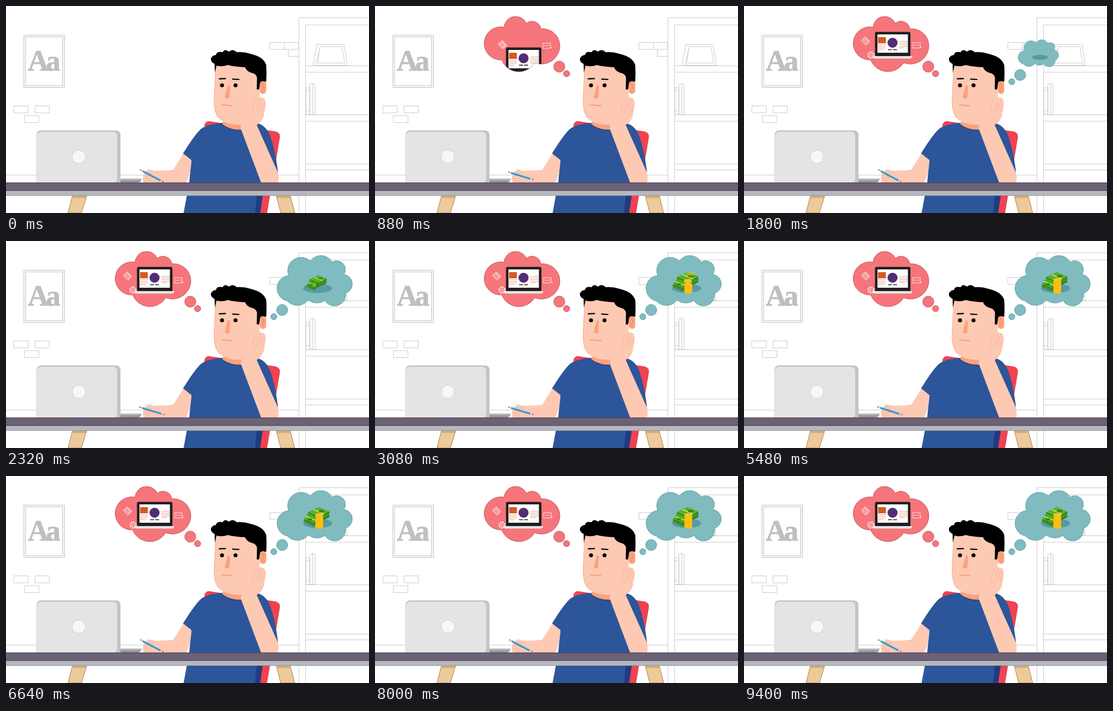
Recreate the animation shown at these times as an HTML page. Size 650 px wide and 372 px high, loop 9.44 s.

```html
<!DOCTYPE html>
<html lang="en">
<head>
<meta charset="utf-8">
<title>Daydreaming at the desk</title>
<style>
  html, body { margin: 0; width: 100%; height: 100%; overflow: hidden; background: #fff; }
  svg { display: block; width: 100vw; height: 100vh; }
  .line { fill: none; stroke: #cbcbcb; stroke-width: 1; }
  .skin { fill: #fdc9b3; }
  .shade { fill: #fba27c; }
  .crease { fill: none; stroke: #f9b399; stroke-width: 1; stroke-linecap: round; }
  .shirt { fill: #2d5599; }
  .navy { fill: #203c80; }
  .chair { fill: #f4414f; stroke: #b92f3c; stroke-width: .7; }
  .pink { fill: #f5757a; stroke: #b9474e; stroke-width: .8; }
  .teal { fill: #80bbc0; stroke: #57959b; stroke-width: .8; }
  .icon { fill: none; stroke: #fff; stroke-width: .8; }
  .wood { fill: #ecca9c; stroke: #a9824c; stroke-width: 1; }
  .poster { font: bold 52px "Liberation Serif", "Noto Serif", serif; letter-spacing: -5px;
            fill: #bfbfbf; stroke: #bfbfbf; stroke-width: .8; }
</style>
</head>
<body>
<svg viewBox="0 0 650 372" preserveAspectRatio="none">
  <defs>
    <path id="bubble" d="M231 38A21 21 0 0 1 271 31A16 16 0 0 1 297 41A31 31 0 0 1 331 70A33 33 0 0 1 286 102A33 33 0 0 1 227 97A29.800 29.800 0 1 1 231 38Z"/>
    <clipPath id="inside"><use href="#bubble"/></clipPath>
  </defs>

  <!-- room -->
  <g class="line">
    <path d="M0 304H524"/>
    <path stroke="#bdbdbd" d="M32 52.500H104.500V146.500H32ZM35 55.500H101.500V143.500H35Z"/>
    <path d="M14 179.500H40V192H14ZM52 179.500H77.500V192H52ZM33 197H59V209.500H33Z"/>
    <path d="M472.500 65.500H524V78H472.500ZM498.500 65.500V78M505.500 78V90.500H524"/>
    <path d="M650 21H524.500V372M650 34H536.500V372M536.500 107.500H650M536.500 119H650M536.500 195.500H650M536.500 207H650M536.500 284H650M536.500 294.500H650"/>
    <path d="M557 69H605.500L611 106.500H555M562.500 73H601.500L606.500 102.500H558ZM557 69L549 108M562 76L554 108"/>
    <path d="M537 147H544V195H537ZM537 152H544M537 188H544M544 141Q549 137 553.500 141V195H544ZM549.500 139V195"/>
  </g>
  <text class="poster" x="39" y="116">Aa</text>

  <!-- first thought -->
  <g id="pinkSmall"><circle class="pink" cx="343" cy="121.500" r="5.600"/></g>
  <g id="pinkLarge"><circle class="pink" cx="330" cy="109" r="10"/></g>
  <g id="pinkCloud"><use href="#bubble" class="pink"/></g>
  <g clip-path="url(#inside)">
    <g class="icon">
      <g id="tile"><path d="M210 62L217 55L225.500 63.500L218.500 70.500ZM212 62L217 57L223.500 63.500L218.500 68.500ZM214 61L220 67M215.500 59.500L221.500 65.500M216.500 58L223 64"/></g>
      <g id="gear">
        <circle cx="227.500" cy="88" r="2.300"/><circle cx="227.500" cy="88" r="4.700"/>
        <circle cx="227.500" cy="88" r="5.700" stroke-width="1.600" stroke-dasharray="2.200 2.280"/>
      </g>
      <g id="chat"><path d="M302 66H315.500V74H318L313 75.500H302Z"/><path d="M304.500 70.500H313" stroke-width="1.500" stroke-dasharray="1.500 2"/></g>
    </g>
    <g id="notebook">
      <rect x="234.500" y="46.500" width="63.500" height="45" rx="3" fill="#231f20"/>
      <path d="M239 51H293.500V84H239Z" fill="#fff"/>
      <path d="M240 56H254V67H240Z" fill="#d65a25"/>
      <circle cx="266" cy="66" r="9" fill="#522d72"/>
      <path d="M240 69.500H254M240 72.500H254M240 75.500H254M240 78.500H250M278 63.500H293M278 66.500H293M278 69.500H293M278 72.500H293M278 75H288" stroke="#e5a184" stroke-width=".9"/>
      <path d="M258 78.500H265M267 78.500H274" stroke="#2a2328" stroke-width="1.700"/>
      <path d="M230 90H301V92Q300 94.500 297 94.500H234Q231 94 230 92Z" fill="#e4e5e7"/>
    </g>
  </g>

  <!-- second thought -->
  <g id="tealSmall"><circle class="teal" cx="479.500" cy="136" r="5.500"/></g>
  <g id="tealLarge"><circle class="teal" cx="494.500" cy="124" r="10"/></g>
  <g id="tealCloud">
    <path class="teal" d="M506 62A24 24 0 0 1 545 36A23 23 0 0 1 584 38A15.500 15.500 0 0 1 605 60A17.500 17.500 0 0 1 608 94A20 20 0 0 1 571 107A25 25 0 0 1 541 106A24 24 0 0 1 504 108A23.300 23.300 0 0 1 506 62Z"/>
    <ellipse cx="558" cy="85" rx="26" ry="8.500" fill="#579ba0"/>
  </g>
  <g id="cash">
    <path d="M541 65L560 56L579 64V74L560 83L541 74Z" fill="#2f7d12"/>
    <path d="M541 65L560 56L579 64L560 73Z" fill="#59b526"/>
    <path d="M534 78L541 67L558 74V84L551 90L533 82Z" fill="#2d780f"/>
    <path d="M534 78L541 67L558 74L551 85Z" fill="#4fac20"/>
    <path d="M533.500 80.500L551 87.500L557 79M560 76L579 67M560 79L579 70" fill="none" stroke="#7acb43" stroke-width=".8"/>
    <path d="M551 60.500L570 68.500M537 72.500L554 79.500" stroke="#cfe39a" stroke-width="1.400"/>
    <ellipse cx="565" cy="63" rx="5" ry="2.300" fill="#34881a"/>
    <ellipse cx="544" cy="78" rx="4" ry="2.200" fill="#34881a"/>
  </g>
  <g id="coins"></g>

  <!-- person -->
  <path class="chair" d="M364 207.500L483 226Q491 228 490 236L467 372H430L361 224Q353 217 357 211Q359 207 364 207.500Z"/>
  <path class="shirt" d="M387 210Q361 212 349 221Q338 231 317 265L332 277L328 318L318 372H455L463 318L487 298Q482 258 473 233Q465 213 447 210Z"/>
  <path class="navy" d="M451 318H463L455 372H446Z"/>
  <path class="shade" d="M391 200L387 213Q402 224 426 223V200Z"/>
  <path d="M386 212.500Q402 225 426 223" fill="none" stroke="#203c80" stroke-width="1.500"/>
  <path class="skin" d="M376 101L372.500 160Q370 191 381 202Q394 214 421 213.500L452 196L458 100Z"/>
  <path class="crease" d="M375 118L373 160Q371 188 381 201"/>
  <path d="M374 120L373.500 104Q366 101 367 94Q370 88 376 88Q377 81 388 83Q392 76 399 82Q406 76 413 83Q426 82 438 86Q461 91 466 106Q467 120 466 136H456L453 150H449L449.500 129Q448 122 441 120.500Q431 118 428 110Q408 109 397 106Q387 110 377 107Z"/>
  <rect class="shade" x="454.500" y="135" width="11.500" height="23" rx="5.700"/>
  <path d="M458 140Q463 141 461 148Q457 151 460 154" fill="none" stroke="#ef845c"/>
  <path d="M382 130.800L393 130.300M406 131.300L417 132" stroke="#000" stroke-width="2.200" stroke-linecap="round"/>
  <g id="eyes"><circle cx="386.800" cy="142.500" r="3.600"/><circle cx="411" cy="142.500" r="3.600"/></g>
  <path class="shade" d="M397 143Q401 141 401 146L400 163Q400 167 396 166Q391 166 392 162Z"/>
  <path d="M386 177.800L405 179.300" stroke="#fa9f79" stroke-width="2" stroke-linecap="round"/>

  <path class="skin" d="M421 222Q419 213 427 207Q438 199 441 187Q443 173 449 167Q455 161 458 165Q465 164 465 175Q465 186 461 195Q459 207 449 214L486 297Q490 306 487 318H457Z"/>
  <path class="crease" d="M441 190Q443 173 449 167M449 187L455 167M454 188L460 167M459 190L463 174M449 188Q447 193 442 195M448 214Q459 207 462 194"/>

  <path class="skin" d="M317.500 265.500L299 295L267 296Q251 293 247 302Q243 309 247 318H322Q331 303 332 277Z"/>
  <path class="crease" d="M247 305H259Q262 308 259 310H247M250 314H260M299 295L294 296"/>
  <g id="pencil">
    <path d="M244 303.500L237.500 305L244 306.500Z" fill="#f1c9a0"/>
    <path d="M240 304.200L236.500 305L240 305.800Z" fill="#252525"/>
    <path d="M243 303.400H280V306.600H243Z" fill="#45b0e6"/>
    <path d="M243 305.200H280V306.600H243Z" fill="#2585bd"/>
    <path d="M279 303.400H282V306.600H279Z" fill="#d7dbe0"/>
    <rect x="282" y="303.400" width="3" height="3.200" rx="1.300" fill="#e4707d"/>
  </g>
  <path class="skin" d="M251 298Q253 292 259 294L266 299Q264 303 259 301Z"/>
  <path class="crease" d="M252 298L259 301L265 299"/>

  <!-- desk and laptop -->
  <path class="wood" d="M119 341H144.500L135 372H111ZM484 341H509L517 372H492Z"/>
  <path d="M119.500 341H144L143 345H118ZM484.500 341H508.500L510 345H486Z" fill="#d3ac78"/>
  <path d="M203 310H243Q242 317 235 318H203Z" fill="#97999b"/>
  <path d="M203 310H243L242 313H203Z" fill="#b8babb"/>
  <path d="M54.500 318V232Q55 223.500 63 223.500H197Q205 224 205 232V318Z" fill="#c4c4c5"/>
  <path d="M55 318V234Q56 226 64 226H191Q199 226 199 234V310Q199 318 191 318Z" fill="#e4e4e4"/>
  <circle cx="130.500" cy="271" r="12" fill="#f7f7f7" stroke="#cfcfcf"/>
  <path d="M0 317.500H650V332H0Z" fill="#6d6175"/>
  <path d="M0 332H650V341H0Z" fill="#b5b8be"/>
  <path d="M0 317.800H650M0 331.700H650" stroke="#49404f"/>
  <path d="M0 340.700H650" stroke="#8d9096" stroke-width=".8"/>
</svg>
<script>
const LOOP = 9440;
const TAP = LOOP / 47;
const $ = id => document.getElementById(id);

// Eased progress from start to end
const ease = (t, start, end) => {
  const p = Math.min(1, Math.max(0, (t - start) / (end - start)));
  return p * p * (3 - 2 * p);
};
const setTransform = (id, value) => $(id).setAttribute('transform', value);
const scaleAt = (id, x, y, sx, sy = sx) =>
  setTransform(id, `translate(${x} ${y}) scale(${sx} ${sy}) translate(${-x} ${-y})`);

// id, pivot x, pivot y, start, end
const pops = [
  ['pinkSmall', 343, 121.5, 0, 240],
  ['pinkLarge', 330, 109, 120, 380],
  ['pinkCloud', 312, 92, 280, 680],
  ['tealSmall', 479.5, 136, 1280, 1520],
  ['tealLarge', 494.5, 124, 1400, 1660],
  ['tealCloud', 497, 101, 1590, 1990],
  ['cash', 556, 82, 2040, 2440]
];

// id, pivot x, pivot y, starting dx, dy, turn, start, end
const slides = [
  ['tile', 218, 62, 29, 19, 20, 620, 1060],
  ['gear', 227.5, 88, 32, 27, 180, 740, 1240],
  ['chat', 309, 70, -30, 18, 0, 600, 920],
  ['notebook', 266, 70, 0, 62, 0, 665, 1070]
];

const coinCount = 6;
$('coins').innerHTML = Array.from({ length: coinCount }, (_, i) => {
  const y = 90 - i * 4.1;
  return `<g id="coin${i}">
    <path d="M554 ${y}V${y + 2.5}A7 2.5 0 0 0 568 ${y + 2.5}V${y}Z" fill="#fbb90e"/>
    <ellipse cx="561" cy="${y}" rx="7" ry="2.5" fill="#ffc71a"/></g>`;
}).join('');

function render(t) {
  for (const [id, x, y, start, end] of pops) scaleAt(id, x, y, ease(t, start, end));

  for (const [id, x, y, dx, dy, turn, start, end] of slides) {
    const left = 1 - ease(t, start, end);
    setTransform(id, `translate(${dx * left} ${dy * left}) rotate(${turn * left} ${x} ${y})`);
    $(id).style.visibility = t < start ? 'hidden' : 'visible';
  }

  for (let i = 0; i < coinCount; i++) {
    const start = 2360 + i * 130;
    const left = 1 - ease(t, start, start + 280);
    setTransform('coin' + i, `translate(${(i % 2 ? 4 : -4) * left} ${-14 * left})`);
    $('coin' + i).style.opacity = Math.min(1, 3 * (1 - left));
  }

  const wave = 1.5 * Math.cos(2 * Math.PI * (t / TAP + 0.06));
  const tilt = 22.3 + 5.3 * Math.max(-1, Math.min(1, wave));
  setTransform('pencil', `rotate(${tilt} 261 305)`);

  const shut = ease(t, 4220, 4340) - ease(t, 4360, 4480);
  scaleAt('eyes', 399, 142.5, 1, 1 - 0.65 * shut);
}

const origin = performance.now();
function tick() {
  render((performance.now() - origin) % LOOP);
  requestAnimationFrame(tick);
}
tick();
</script>
</body>
</html>
```
